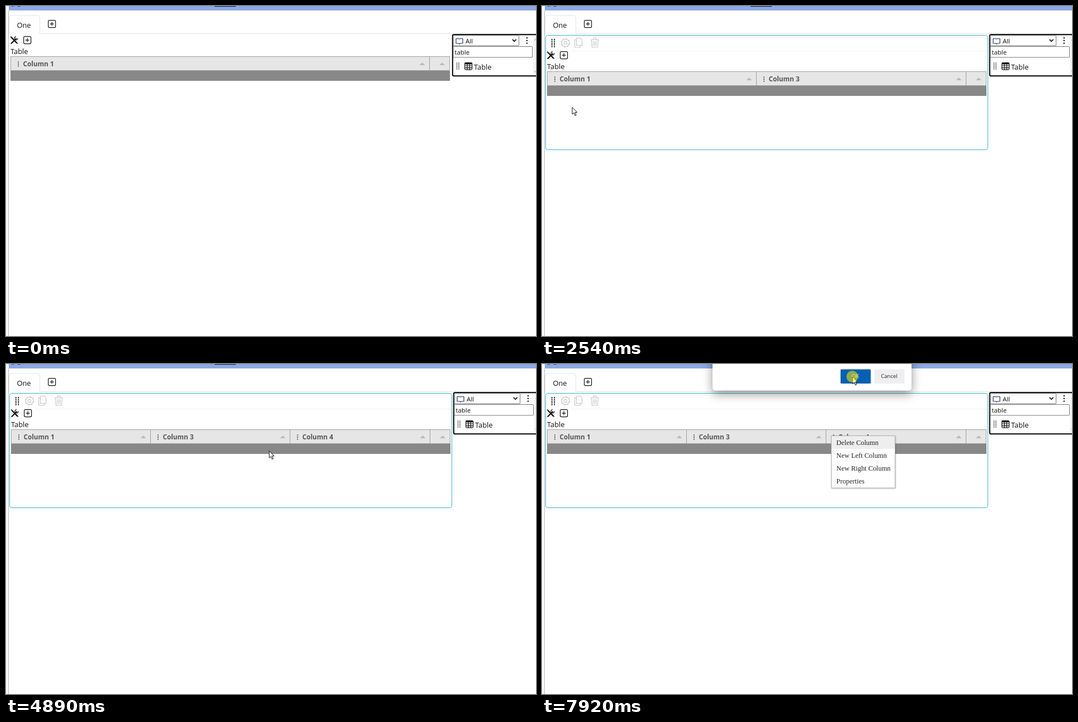
An HTML page that plays this animation: 948x591 px, repeating every 8000 ms.

```html
<!DOCTYPE html>
<html lang="en">
<head>
<meta charset="utf-8">
<title>Table columns</title>
<style>
  html, body { margin: 0; width: 100%; height: 100%; overflow: hidden; background: #fff; }
  svg { display: block; width: 948px; height: 591px; font-family: "Open Sans", "Noto Sans", sans-serif; }
  .label { font-size: 12.8px; fill: #111; }
  .small { font-size: 11.4px; fill: #111; }
  .head { font-size: 11.75px; font-weight: 700; fill: #555; }
  .menu { font: 12.4px "Liberation Serif", serif; fill: #222; }
  .btn { font-size: 9.5px; text-anchor: middle; }
  .line { fill: none; stroke: #111; stroke-width: 1.2; }
  .gray { fill: none; stroke: #c6c6c6; stroke-width: 1.1; }
  #dialog { filter: drop-shadow(0 6px 9px rgba(0, 0, 0, .42)); }
  #menu > rect:first-child { filter: drop-shadow(1px 1px 1px rgba(0, 0, 0, .2)); }
</style>
</head>
<body>
<svg viewBox="0 0 948 591">
  <defs>
    <g id="plus">
      <rect class="line" x=".6" y=".6" width="13" height="13" rx="2"/>
      <path class="line" d="M7.1 3.6v7M3.6 7.1h7"/>
    </g>
  </defs>

  <rect width="4" height="591" fill="#fafafa"/>
  <path d="M4.5 8V591" stroke="#bbb"/>
  <rect x="5" width="943" height="8" fill="#8ca9e4"/>
  <path d="M10 0h4M21 0h5M373 .5h38" stroke="#1c2540" stroke-width="1.4"/>
  <path d="M5.500 50V21q0-4 4-4H56.500q4 0 4 4V49.500H948" fill="none" stroke="#dee2e6"/>
  <text class="label" x="19.500" y="38.500">One</text>
  <use href="#plus" x="75" y="25"/>

  <g id="panel">
    <rect x="6.500" y="52.500" width="791" height="205" rx="4" fill="#fff" stroke="#35b3c7"/>
    <path d="M53 80.500H796" stroke="#f3f3f3"/>
    <path d="M17.800 59v15M22.200 59v15" stroke="#111" stroke-width="2" stroke-dasharray="2 1.200"/>
    <circle class="gray" cx="42" cy="66" r="6.800"/>
    <circle class="gray" cx="42" cy="66" r="7.600" stroke-dasharray="3 2.970"/>
    <circle class="gray" cx="42" cy="66" r="2.800"/>
    <path class="gray" d="M61.500 57.500h7l3 3v10h-10zM61 60.500h-2.500v13.500h10v-3M87 60.500h15M92 60v-2.500h5V60M88.500 61l1 13h10l1-13M92 63v8.500M94.500 63v8.500M97 63v8.500"/>
  </g>

  <g id="work">
    <path d="M11 83.500l9 9.500" stroke="#111" stroke-width="2.400" stroke-linecap="round"/>
    <path d="M10.500 94l8.500-8.500" stroke="#111" stroke-width="2.200" stroke-linecap="round"/>
    <path d="M22 84.500a3 3 0 1 1-3-2.700M9 83l1.500-1.500M19 91.500l3 3" class="line" stroke-width="1.800"/>
    <use href="#plus" x="32" y="81"/>
    <text class="label" x="9" y="113">Table</text>
    <rect x="9" y="117" width="786" height="44" fill="#888"/>
    <rect x="9" y="117" width="786" height="26" fill="#a0a0a0"/>
    <rect x="759" y="118" width="35" height="24" fill="#e6e6e6"/>
    <path d="M776 133l5-5 5 5z" fill="#bbb"/>
    <g id="cols"></g>
  </g>

  <g id="palette">
    <rect x="944.500" y="53" width="8" height="72" fill="#f4f4f4"/>
    <path d="M960 51.200H803q-2.200 0-2.200 2.200V123q0 2.200 2.200 2.200H960" fill="none" stroke="#000" stroke-width="2"/>
    <path d="M947 62l3-3M947 116l3 3" stroke="#999"/>
    <rect x="802" y="52.500" width="117.500" height="18.500" rx="1" fill="#fff" stroke="#767676"/>
    <path d="M807 58.500h4.500l1.500.7 1.500-.7h4.500v8.500h-4.500l-1.500 1-1.500-1H807z" fill="#fff" stroke="#24345c" stroke-width="1.200"/>
    <text class="small" x="824" y="66.500">All</text>
    <path d="M907.800 59.800l3.400 3.500 3.400-3.500" fill="none" stroke="#111" stroke-width="1.700"/>
    <path d="M933.800 56v12" stroke="#111" stroke-width="2.200" stroke-dasharray="2.200 2.600"/>
    <rect x="802" y="72.500" width="141.500" height="19.500" rx="1" fill="#fff" stroke="#767676"/>
    <text class="small" x="804.500" y="86.500">table</text>
    <path d="M808.500 101.500v12M812 101.500v12" stroke="#222" stroke-width="1.500" stroke-dasharray="1.500 1.100"/>
    <rect class="line" x="822.600" y="101.600" width="13" height="12.500" rx="1.500"/>
    <path d="M823 103.200h12.500" stroke="#111" stroke-width="2.500"/>
    <path class="line" d="M822.600 107h13M822.600 110.600h13M827 102v12M831.300 102v12" stroke-width="1"/>
    <text class="label" x="839" y="114">Table</text>
  </g>

  <g id="menu">
    <rect x=".5" y=".5" width="114" height="93.500" fill="#fff" stroke="#aaa"/>
    <rect id="pick" x="1" y="1" width="113" height="23" fill="#eee"/>
  </g>

  <g id="dialog">
    <rect x="305" y="-120" width="356" height="167.500" rx="5" fill="#fff"/>
    <rect x="534" y="9.500" width="54" height="25.500" rx="1.500" fill="#0660b2"/>
    <rect x="594.500" y="9.500" width="54" height="25.500" rx="1.500" fill="#efeff1"/>
    <text class="btn" x="560.500" y="25.300" fill="#fff">OK</text>
    <text class="btn" x="621" y="25.300" fill="#222">Cancel</text>
  </g>

  <g id="cursor" fill="#fff" stroke="#111" stroke-linejoin="round">
    <path id="arrow" d="M.5.500V13L3.400 10.300 5.600 15.300 7.600 14.400 5.500 9.600H9.300Z"/>
    <path id="hand" d="M-1.500 10V1a1.500 1.500 0 0 1 3 0V6.200q1.300-1 2.600.2 1.400-.8 2.400.5 2-.3 2 1.600V12q0 2-1.300 3.800v1.700H.500V16Q-2.500 13-4.300 9.700q0-2 1.700-1.200zM1.500 6.200v3.300M4.100 6.400v3.100M6.500 7v2.500"/>
    <circle id="click" r="10.500" fill="#ffeb00" fill-opacity=".55" stroke="none"/>
  </g>
</svg>

<script>
const LOOP = 8000;
const $ = id => document.getElementById(id);
const show = (el, on) => { el.style.display = on ? '' : 'none'; };
const move = (el, x, y) => el.setAttribute('transform', `translate(${x} ${y})`);

function add(parent, tag, attrs, text) {
  const el = document.createElementNS('http://www.w3.org/2000/svg', tag);
  for (const key in attrs) el.setAttribute(key, attrs[key]);
  if (text) el.textContent = text;
  return parent.appendChild(el);
}

// pointer path: time, x, y
const path = [
  [70, 200, 531], [400, 90, 250], [820, 12, 133], [890, 12, 133], [1160, 23, 132],
  [1430, 23, 132], [1990, 52, 190], [2400, 52, 190], [2540, 53, 181], [2960, 335, 139],
  [3170, 398, 123], [3430, 398, 123], [3740, 423, 186], [4200, 423, 186], [4820, 462, 160],
  [5250, 517, 130], [5680, 517, 130], [5980, 540, 212], [6250, 540, 212], [6700, 555, 147],
  [7180, 555, 147], [7780, 555, 22.500], [LOOP, 555, 22.500]
];
const clicks = [1360, 2190, 3390, 4070, 5360, 6870, 7920];
// open, close, x, y
const menus = [[1430, 2260, 22, 132], [3460, 4140, 398, 122], [5430, LOOP, 517, 128]];
const HOVER_AT = 390, DIALOG_AT = 6940;

const layouts = [[10, 759], [10, 384, 759], [10, 259, 508.500, 759]].map(edges => {
  const group = add($('cols'), 'g', {});
  const cells = edges.slice(1).map((end, i) => {
    const x = edges[i];
    const rect = add(group, 'rect', { x, y: 118, width: end - x - 1, height: 24 });
    add(group, 'path', { d: `M${x + 13} 126.500v9`, stroke: '#444', 'stroke-width': 1.800, 'stroke-dasharray': '1.800 1.800' });
    add(group, 'text', { class: 'head', x: x + 21.500, y: 135 }, 'Column ' + [1, 3, 4][i]);
    add(group, 'path', { d: `M${end - 18.500} 133l5-5 5 5z`, fill: '#bbb' });
    return { rect, x, end };
  });
  return { group, cells };
});

['Delete Column', 'New Left Column', 'New Right Column', 'Properties'].forEach((name, i) =>
  add($('menu'), 'text', { class: 'menu', x: 9.500, y: 17 + i * 23.100 }, name));

// slope at a key; zero next to a rest
function slope(i, k) {
  const a = path[i - 1], b = path[i], c = path[i + 1];
  if (!a || !c || a[k] === b[k] || b[k] === c[k]) return 0;
  return (c[k] - a[k]) / (c[0] - a[0]);
}

function pointer(t) {
  let i = path.findIndex(p => p[0] > t) - 1;
  if (i < 0) i = 0;
  const a = path[i], b = path[i + 1], d = b[0] - a[0];
  const u = Math.max(0, (t - a[0]) / d), v = 1 - u;
  return [1, 2].map(k =>
    v * v * (1 + 2 * u) * a[k] + u * u * (3 - 2 * u) * b[k] +
    d * u * v * (v * slope(i, k) - u * slope(i + 1, k)));
}

function draw(t) {
  const [x, y] = pointer(t);
  const hover = t >= HOVER_AT, dialog = t >= DIALOG_AT;
  const menu = menus.find(m => t >= m[0] && t < m[1]);
  const count = t < 2260 ? 0 : t < 4140 ? 1 : 2;

  show($('panel'), hover);
  move($('work'), hover ? 0 : -1, hover ? 0 : -27);
  move($('palette'), hover ? 0 : -2, 0);

  let onHead = false;
  layouts.forEach(({ group, cells }, i) => {
    show(group, i === count);
    for (const { rect, x: left, end } of cells) {
      const on = i === count && hover && !menu && y > 117 && y < 143 && x >= left && x < end;
      rect.setAttribute('fill', on ? '#ccc' : '#e6e6e6');
      onHead = onHead || on;
    }
  });

  show($('menu'), menu);
  if (menu) {
    move($('menu'), menu[2], menu[3]);
    const item = Math.max(0, Math.min(3, Math.floor((y - menu[3] - 1) / 23)));
    $('pick').setAttribute('y', 1 + item * 23.100);
  }

  show($('dialog'), dialog);
  $('dialog').style.opacity = Math.min(1, .5 + (t - DIALOG_AT) / 280);

  const hand = onHead || (menu && !dialog);
  show($('cursor'), t >= 70);
  show($('hand'), hand);
  show($('arrow'), !hand);
  show($('click'), clicks.some(c => t >= c && t < c + 140));
  move($('cursor'), x, y);
}

function tick() {
  draw(performance.now() % LOOP);
  requestAnimationFrame(tick);
}
tick();
</script>
</body>
</html>
```
